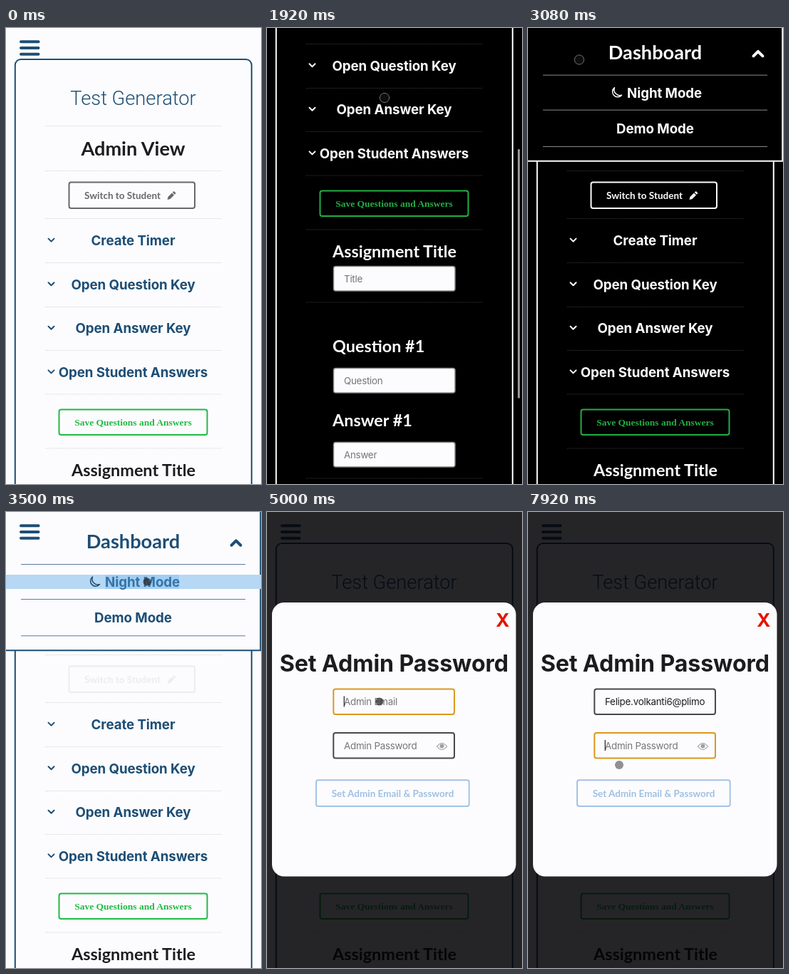
These frames come from a looping animation (358 px wide and 640 px high, 8000 ms). An HTML page:

```html
<!DOCTYPE html>
<html lang="en">
<head>
<meta charset="utf-8">
<title>Test Generator</title>
<style>
  html, body { margin: 0; width: 100%; height: 100%; overflow: hidden; background: #fcfcfe; }
  svg { display: block; width: 100%; height: 100%; }
  #app { --bg: #fcfcfe; --ink: #1d4e75; --head: #1c1c1e; --line: #dadada; --save: #21ba45; --rule: #587c9c; }
  #app.night { --bg: #000; --ink: #fcfcfe; --head: #fcfcfe; --line: #2e2e2e; --save: #21b045; --rule: #8c8c8c; }
  .bg { fill: var(--bg); }
  .ink { fill: var(--ink); }
  .head { fill: var(--head); }
  .stroke { fill: none; stroke: var(--ink); }
  .line { stroke: var(--line); stroke-dasharray: 1.5 1; }
  .rule { stroke: var(--rule); }
  text { white-space: pre; }
  .ui { font-family: Inter, sans-serif; font-weight: 700; letter-spacing: -.004em; }
  .field { font-family: Inter, sans-serif; font-size: 13.4px; letter-spacing: -.02em; }
  .lato { font-family: Lato, sans-serif; font-weight: 700; }
  .thin { font-family: Roboto, sans-serif; font-weight: 300; }
  .serif { font-family: "Liberation Serif", serif; font-weight: 700; }
  .mid { text-anchor: middle; }
  .hint { fill: #757575; }
</style>
</head>
<body>
<svg viewBox="0 0 358 640" xmlns="http://www.w3.org/2000/svg">
  <defs><clipPath id="clip"><rect x="107" y="250" width="141.5" height="33"/></clipPath></defs>
  <g id="app">
    <rect class="bg" width="358" height="640"/>
    <g id="page"></g>
    <g id="dash"></g>
    <g id="menu" class="stroke" stroke-width="4" stroke-linecap="round"></g>
    <rect id="thumb" x="352" width="3" height="350" rx="1.5" fill="#989898"/>
  </g>
  <rect id="shade" width="358" height="640" style="mix-blend-mode:multiply"/>
  <g id="modal"></g>
  <circle id="pointer"/>
</svg>
<script>
const LOOP = 8000;
const EMAIL = "Felipe.volkanti6@plimo.com";
const $ = id => document.getElementById(id);

// Markup helpers
const text = (s, x, y, size, cls, extra = "") =>
  `<text x="${x}" y="${y}" font-size="${size}" class="${cls}" ${extra}>${s}</text>`;
const hline = (x1, x2, y, cls) => `<path class="${cls}" d="M${x1} ${y}H${x2}"/>`;
const box = (x, y, w, h, attrs) =>
  `<rect x="${x}" y="${y}" width="${w}" height="${h}" rx="3" ${attrs}/>`;
const chevron = (x, y, w, h, sw) =>
  `<path class="stroke" stroke-width="${sw}" stroke-linecap="round" stroke-linejoin="round" d="M${x - w} ${y - h}l${w} ${2 * h}l${w} ${-2 * h}"/>`;

const sections = ["Create Timer", "Open Question Key", "Open Answer Key", "Open Student Answers"];
const fields = [["Assignment Title", "Title", 629, 641.5], ["Question #1", "Question", 762, 784.5], ["Answer #1", "Answer", 866, 888.5]];

$("page").innerHTML =
  `<rect x="12.8" y="44" width="332" height="1110" rx="8" class="stroke" stroke-width="2"/>` +
  text("Test Generator", 178.5, 108, 27.3, "thin ink mid") +
  text("Admin View", 178.5, 179, 27.1, "lato head mid") +
  [137.5, 200.5, 267.5, 329.5, 391.5, 452.5, 514, 590, 692, 939].map(y => hline(55, 303, y, "line")).join("") +
  `<g id="switch">` +
    box(88.5, 216.5, 176.5, 36.5, 'fill="none" stroke="currentColor" stroke-width="2"') +
    text("Switch to Student", 110, 239.5, 13.5, "lato", 'fill="currentColor"') +
    `<path fill="currentColor" d="M226.5 241l1-4 5.5-5.5 3 3-5.5 5.5zM233.8 230.7l1.2-1.2q.7-.5 1.4.1l1.6 1.6q.6.7 0 1.3l-1.2 1.2z"/></g>` +
  sections.map((s, i) =>
    text(s, 178.5, 305 + i * 61.6, 18.72, "ui ink mid") + chevron(63.5, 297.6 + i * 61.6, 4, 2, 2)).join("") +
  box(74.5, 535.5, 208, 35.5, 'fill="none" stroke="var(--save)" stroke-width="2"') +
  text("Save Questions and Answers", 178.5, 557.5, 13.5, "serif mid", 'fill="var(--save)"') +
  fields.map(([title, hint, ty, by]) =>
    text(title, 92, ty, 23.4, "lato head") +
    box(93.5, by, 170.5, 34.5, 'fill="#fcfcfe" stroke="#8a8a8a" stroke-width="1.5"') +
    text(hint, 108, by + 22.3, 13.4, "field hint")).join("");

$("dash").innerHTML =
  `<rect class="bg" width="358" height="194"/>` +
  `<path class="stroke" stroke-width="2" d="M0 194.2H357.3V0"/>` +
  `<g id="mark"><rect y="88" width="358" height="20" fill="#b6d8f4"/><rect x="139" y="88" width="104" height="20" fill="#a2cdf2"/></g>` +
  text("Dashboard", 178.5, 51, 27.2, "lato ink mid") +
  chevron(323, 43.5, 6.5, -3.2, 4) +
  [73.5, 122.5, 173.8].map(y => hline(21, 336, y, "rule")).join("") +
  `<path class="stroke" stroke-width="1.5" stroke-linejoin="round" d="M121.5 91a7.3 7.3 0 1 0 10 10.5a8 8 0 0 1-10-10.5z"/>` +
  text("Night Mode", 139, 105, 18.72, "ui ink", 'id="nightLabel"') +
  text("Demo Mode", 178.5, 155, 18.72, "ui ink mid");

$("menu").innerHTML = [19.2, 28, 36.8].map(y => `<path d="M21 ${y}H45.5"/>`).join("");

$("modal").innerHTML =
  `<rect x="7" y="127" width="342.5" height="384.5" rx="17" fill="#fcfcfe"/>` +
  text("X", 330.7, 160.5, 26, "ui mid", 'fill="#e21400"') +
  text("Set Admin Password", 178.3, 224.3, 32.2, "ui mid", 'fill="#1c1c1e"') +
  box(93.3, 248.5, 169.7, 35.5, 'id="mailBox" fill="#fcfcfe" stroke-width="2"') +
  box(93.3, 310, 169.7, 35.5, 'id="passBox" fill="#fcfcfe" stroke-width="2"') +
  text("Admin Email", 108, 271, 13.4, "field hint", 'id="mailHint"') +
  `<g clip-path="url(#clip)">` + text("", 108, 271, 13.4, "field", 'id="mail" fill="#1c1c1e"') + `</g>` +
  text("Admin Password", 108, 333, 13.4, "field hint") +
  `<g fill="none" stroke="#a0a0a0" stroke-width="1.2"><path d="M238.5 329q7-9 14 0q-7 9-14 0z"/><circle cx="245.5" cy="328.6" r="2.4" fill="#a0a0a0"/></g>` +
  `<path id="caret" stroke="#1c1c1e" stroke-width="1.2"/>` +
  box(69, 376.3, 214.7, 36.7, 'fill="none" stroke="#a4c2e6" stroke-width="2"') +
  text("Set Admin Email &amp; Password", 176.5, 399.7, 13.5, "lato mid", 'fill="#a0bfe2"');

// Timing helpers
const clamp = v => Math.max(0, Math.min(1, v));
const ramp = (t, a, b) => { const u = clamp((t - a) / (b - a)); return u * u * (3 - 2 * u); };
const within = (t, a, b) => t >= a && t < b;
const mix = (a, b, u) => `rgb(${a.map((v, i) => Math.round(v + (b[i] - v) * u))})`;
const track = (keys, t) => {
  let v = keys[0].slice(1);
  for (let i = 1; i < keys.length; i++) {
    const u = ramp(t, keys[i - 1][0], keys[i][0]);
    v = v.map((p, k) => p + (keys[i][k + 1] - keys[i - 1][k + 1]) * u);
  }
  return v;
};

const pointerPath = [
  [300, 80, 60], [700, 33, 28], [980, 33, 28], [1250, 165, 98], [2640, 165, 98],
  [2800, 33, 28], [2980, 33, 28], [3300, 198, 98], [3750, 198, 98], [4150, 165, 235],
  [4600, 165, 235], [4880, 158, 266], [7200, 158, 266], [7420, 128, 328], [7580, 128, 328], [7880, 128, 355]
];
const presses = [[860, 980], [1290, 1440], [2840, 2960], [3360, 3560], [4260, 4400], [4930, 5080], [7440, 7540]];
const GREY = [104, 104, 104], WHITE = [252, 252, 254], SHADE = [37, 37, 40];

function drawPage(t, night) {
  const scroll = 307 * (ramp(t, 1600, 1920) - ramp(t, 2000, 2635));
  $("app").setAttribute("class", night ? "night" : "");
  $("page").setAttribute("transform", `translate(0 ${-scroll})`);
  $("menu").setAttribute("transform", `translate(0 ${-scroll})`);
  $("switch").style.color = mix(GREY, WHITE, ramp(t, 1440, 1740) - ramp(t, 3420, 3820));
  $("thumb").setAttribute("y", scroll * .553);
  $("thumb").setAttribute("opacity", ramp(t, 1600, 1700) - ramp(t, 2640, 2840));
}

function drawDash(t) {
  const open = ramp(t, 930, 1180) - ramp(t, 1450, 1650) + ramp(t, 2860, 3110) - ramp(t, 3520, 3820);
  const marked = within(t, 3400, 3900);
  $("dash").setAttribute("transform", `translate(0 ${-197 * (1 - open)})`);
  $("menu").setAttribute("visibility", within(t, 930, 1440) || within(t, 2860, 3420) ? "hidden" : "visible");
  $("mark").setAttribute("opacity", marked ? 1 : 0);
  $("nightLabel").style.fill = marked ? "#3474a8" : "";
}

function drawModal(t) {
  const shown = ramp(t, 4340, 4560);
  $("shade").setAttribute("fill", mix([255, 255, 255], SHADE, shown));
  $("modal").setAttribute("opacity", shown);

  const onMail = within(t, 4940, 7480), onPass = t >= 7480;
  const border = on => on ? "#dc981e" : "#48484c";
  $("mailBox").setAttribute("stroke", border(onMail));
  $("passBox").setAttribute("stroke", border(onPass));

  const typed = EMAIL.slice(0, Math.floor(clamp((t - 5250) / 1600) * EMAIL.length));
  const mail = $("mail");
  if (mail.textContent !== typed) mail.textContent = typed;
  const width = typed ? mail.getComputedTextLength() : 0;
  const shift = onMail ? Math.max(0, width - 139.5) : 0;
  mail.setAttribute("x", 108 - shift);
  $("mailHint").setAttribute("opacity", typed ? 0 : 1);

  const x = onPass ? 108.3 : 108.3 + width - shift, y = onPass ? 320 : 258.5;
  const blink = within(t, 5250, 6900) || (t - 4940) % 1000 < 500 || t >= 7480;
  $("caret").setAttribute("d", `M${x} ${y}v15`);
  $("caret").setAttribute("opacity", (onMail || onPass) && blink ? 1 : 0);
}

function drawPointer(t, night) {
  const [x, y] = track(pointerPath, t);
  const pressed = presses.some(([a, b]) => within(t, a, b));
  const p = $("pointer");
  const attrs = {
    cx: x, cy: y,
    r: night ? 6.6 : pressed ? 5.5 : 6,
    fill: night ? "#555" : pressed ? "#2c2c2e" : "#58585a",
    "fill-opacity": night ? .15 : pressed ? .75 : .66,
    stroke: night ? "#747474" : "none",
    opacity: ramp(t, 300, 420) - ramp(t, 5200, 5280) + ramp(t, 7150, 7230)
  };
  for (const k in attrs) p.setAttribute(k, attrs[k]);
}

function render(t) {
  const night = within(t, 1440, 3420);
  drawPage(t, night);
  drawDash(t);
  drawModal(t);
  drawPointer(t, night);
}

const start = performance.now();
function tick() {
  render((performance.now() - start) % LOOP);
  requestAnimationFrame(tick);
}
tick();
</script>
</body>
</html>
```
